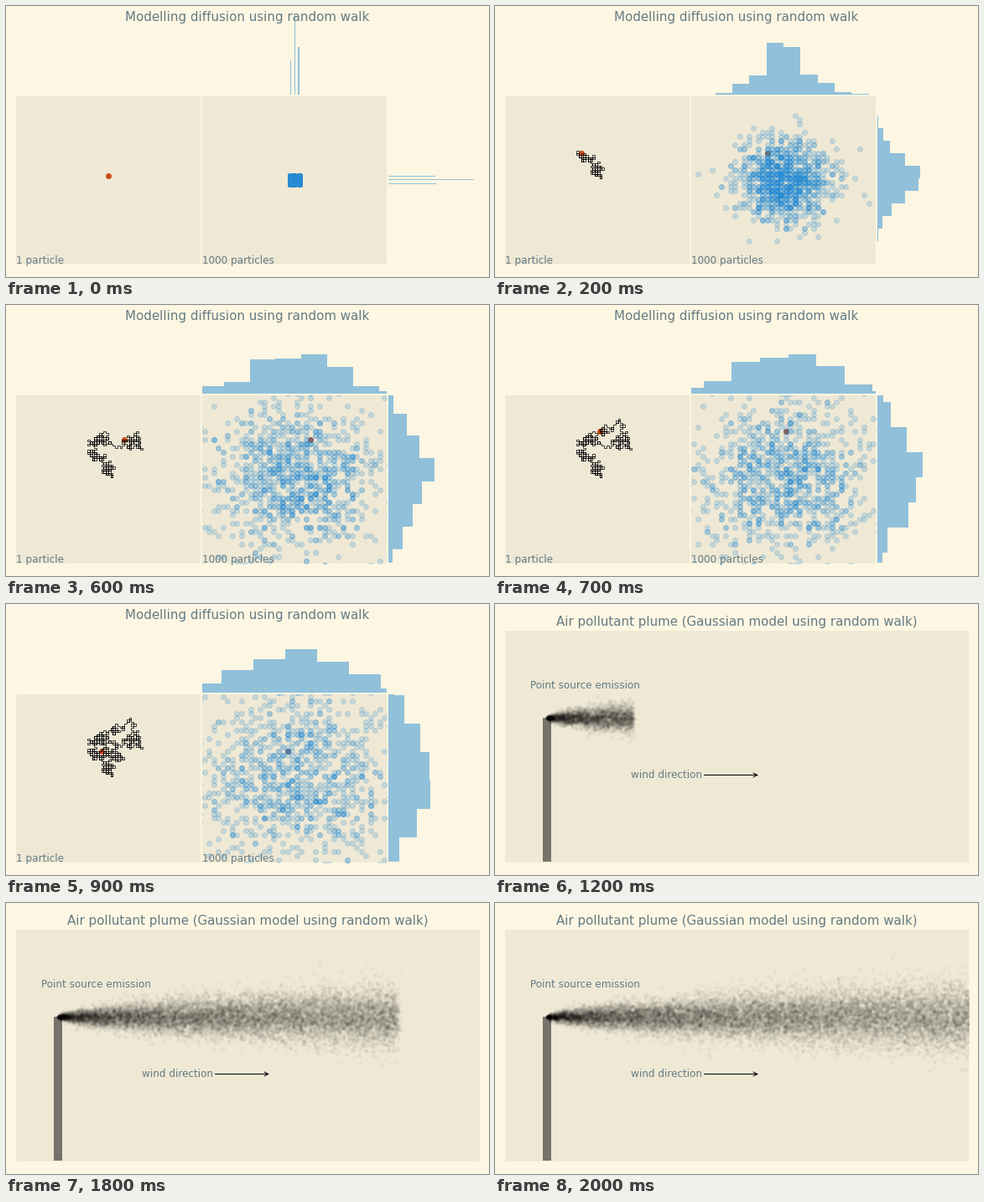
These frames come from a looping animation (576 by 324 pixels, 2.1 s). A matplotlib script:

```python
import numpy as np
import matplotlib.pyplot as plt
from matplotlib.animation import FuncAnimation

W, H, DPI = 576, 324, 72     # one point is one pixel
CREAM, SAND, GREY = "#fdf6e3", "#eee8d5", "#657b83"
BLUE, ORANGE = "#268bd2", "#cb4b16"
FRAMES, WALK_FRAMES = 21, 10
PARTICLES, PUFFS = 1000, 17000
UX, UY = 2.75, 2.5           # pixels per walk step
LEFT, RIGHT, MID = 122, 344, 208
BASE_X, BASE_Y = 106, 456    # histogram baselines
rng = np.random.default_rng(11)

# Places the single particle passes: step number, x, y
STOPS = [(0, 0, 0), (2, 0, 2), (50, -2, 4), (100, -8, 12), (150, -6, 18),
         (201, -5, 17), (275, 13, 19), (351, 1, 23), (425, 1, 11),
         (451, -3, 13)]


def steps(k):
    return 50 * k + 1 if k else 2


def guided_walk(stops):
    """Random +-1 walk in x and y, drawn towards each stop in turn."""
    pos = [np.array(stops[0][1:])]
    for (n0, *_), (n1, *goal) in zip(stops, stops[1:]):
        for left in range(n1 - n0, 0, -1):
            up = 0.5 + (goal - pos[-1]) / left
            pos.append(pos[-1] + np.where(rng.random(2) < up, 1, -1))
    return np.array(pos)


fig = plt.figure(figsize=(W / DPI, H / DPI), dpi=DPI, facecolor=CREAM)


def panel(x0, y0, x1, y1, color="none"):
    """Axes whose data coordinates are stage pixels, y down."""
    ax = fig.add_axes([x0 / W, 1 - y1 / H, (x1 - x0) / W, (y1 - y0) / H],
                      facecolor=color)
    ax.set(xlim=(x0, x1), ylim=(y1, y0), xticks=[], yticks=[])
    ax.spines[:].set_visible(False)
    return ax


def label(x, y, s, size=12, ha="left"):
    return fig.text(x / W, 1 - y / H, s, size=size, color=GREY, ha=ha,
                    va="baseline", family="DejaVu Sans")


def dots(ax, color, size=6, edge=1, **kw):
    return ax.plot([], [], "o", color=color, ms=size, mew=edge, **kw)[0]


def bars(ax, base, **kw):
    box = ax.axis()
    art = ax.stairs([base] * 10, range(11), baseline=base, fill=True,
                    color=BLUE, alpha=0.5, lw=0, **kw)
    ax.axis(box)
    return art


# Diffusion scene
one = panel(12, 108, 232, 309, SAND)
many = panel(234, 108, 454, 309, SAND)
top = panel(234, 11, 454, BASE_X)
side = panel(BASE_Y, 108, 564, 308)
walker = dots(one, ORANGE, zorder=2)
trail, = one.plot([], [], color="black", lw=0.7, snap=True, zorder=3)
marked = dots(many, ORANGE, zorder=2)
cloud = dots(many, BLUE, alpha=0.2, zorder=3)
bars_x = bars(top, BASE_X)
bars_y = bars(side, BASE_Y, orientation="horizontal")
diffusion = [one, many, top, side,
             label(288, 18, "Modelling diffusion using random walk", 15, "center"),
             label(12, 308, "1 particle"),
             label(234, 308, "1000 particles")]

# Plume scene
air = panel(12, 32, 565, 309, SAND)
air.add_patch(plt.Rectangle((57, 136), 10, 172, color="black", alpha=0.5, lw=0))
smoke = dots(air, "black", 4.2, 0, alpha=0.03, zorder=3)
air.annotate("", xy=(314, 204.5), xytext=(249.5, 204.5),
             arrowprops=dict(arrowstyle="->", lw=1, color="black",
                             shrinkA=0, shrinkB=0, mutation_scale=12))
plume = [air,
         label(288, 26, "Air pollutant plume (Gaussian model using random walk)",
               15, "center"),
         label(42, 101, "Point source emission"),
         label(162, 208, "wind direction")]

# Every particle steps +-1 in both x and y; the first one is followed
hero = guided_walk(STOPS)
moves = rng.choice([-1, 1], size=(len(hero) - 1, PARTICLES, 2))
walks = np.concatenate([np.zeros((1, PARTICLES, 2)), moves.cumsum(axis=0)])
walks[:, 0] = hero

# Smoke: emission times, then a Brownian path sampled once per frame
DRIFT = 50.3
PLUME_FRAMES = FRAMES - WALK_FRAMES
born = rng.uniform(0, DRIFT * (PLUME_FRAMES - 1) + 2, PUFFS)
ages = np.maximum(DRIFT * np.arange(PLUME_FRAMES)[:, None] + 2 - born, 0)
gain = np.sqrt(np.diff(ages, axis=0, prepend=0))
drift_x, drift_y = [(s * gain * rng.normal(size=gain.shape)).cumsum(axis=0)
                    for s in (0.15, 0.9)]


def draw_walk(k):
    n = steps(k)
    x, y = walks[n].T
    px, py = RIGHT + UX * x, MID - UY * y
    cloud.set_data(px, py)
    marked.set_data(px[:1], py[:1])
    walker.set_data(px[:1] - RIGHT + LEFT, py[:1])

    count, edges = np.histogram(x, bins=10)
    bars_x.set_data(BASE_X - 0.2 * count, RIGHT + UX * edges)
    count, edges = np.histogram(y, bins=10)
    bars_y.set_data(BASE_Y + 0.215 * count, MID - UY * edges)

    # Each step is drawn as a move in x, then one in y
    tx, ty = hero[2:n + 1].T
    trail.set_data(LEFT + UX * tx.repeat(2)[1:], MID - UY * ty.repeat(2)[:-1])


def draw_plume(j):
    out = ages[j] > 0
    smoke.set_data((62 + ages[j] + drift_x[j])[out], (136 + drift_y[j])[out])


def draw(i):
    walking = i < WALK_FRAMES
    for item in diffusion:
        item.set_visible(walking)
    for item in plume:
        item.set_visible(not walking)
    if walking:
        draw_walk(i)
    else:
        draw_plume(i - WALK_FRAMES)
    return []


anim = FuncAnimation(fig, draw, frames=FRAMES, interval=100, repeat=True,
                     repeat_delay=0, init_func=lambda: draw(0))
plt.show()
```
